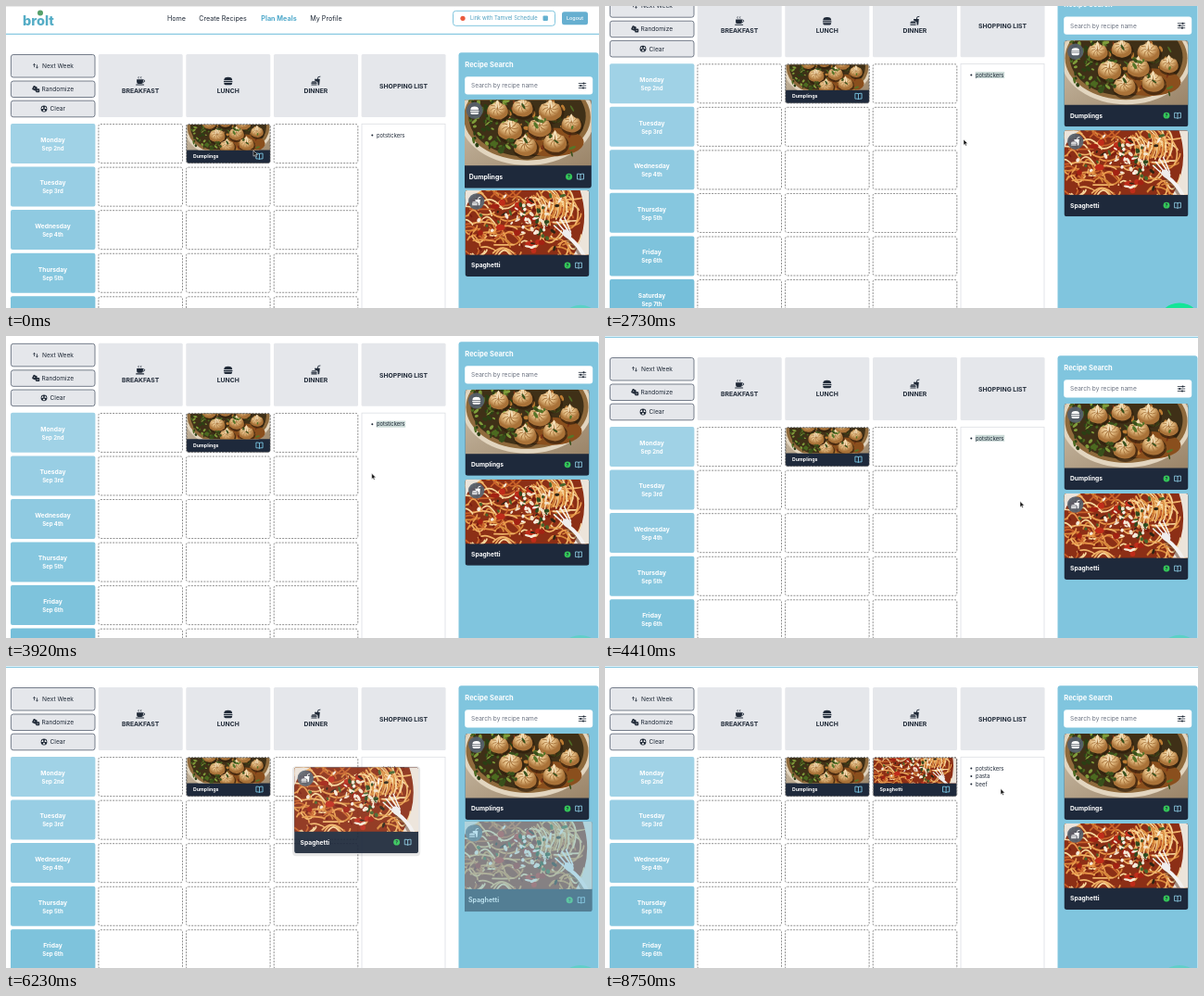
Write an HTML page that moves like this. It is 640 px wide and 326 px high and loops after 8.82 s.

```html
<!DOCTYPE html>
<html lang="en">
<head>
<meta charset="utf-8">
<title>Meal planner</title>
<style>
  html, body { margin: 0; width: 100%; height: 100%; overflow: hidden; background: #fff; }
  svg#stage { display: block; width: 100vw; height: 100vh; }
  text { font-family: Inter, "Open Sans", sans-serif; }
</style>
</head>
<body>
<svg id="stage" viewBox="0 0 640 326"></svg>
<script>
const LOOP = 8820, STEP = 70;
const INK = '#1f2937', BLUE = '#80c5de', NAVY = '#1e293b', GREY = '#e5e7eb';

let seed = 11;
const rnd = (a = 0, b = 1) => {
  seed = (seed * 16807) % 2147483647;
  return a + (b - a) * seed / 2147483647;
};
const pick = list => list[Math.floor(rnd(0, list.length))];
const many = (n, fn) => Array.from({ length: n }, (_, i) => fn(i)).join('');

// y is the vertical middle of the letters
const txt = (x, y, s, size, o = {}) =>
  `<text x="${x}" y="${y + size * .36}" font-size="${size}" font-weight="${o.w || 400}"
    fill="${o.fill || INK}" text-anchor="${o.at || 'start'}">${s}</text>`;
const mid = (x, y, s, size, o = {}) => txt(x, y, s, size, { ...o, at: 'middle' });
const box = (x, y, w, h, fill, more = '') =>
  `<rect x="${x}" y="${y}" width="${w}" height="${h}" fill="${fill}" ${more}/>`;
const path = (d, stroke, w, more = '') =>
  `<path d="${d}" fill="none" stroke="${stroke}" stroke-width="${w}" stroke-linecap="round" ${more}/>`;
const put = (x, y, s, k = 1) => `<g transform="translate(${x} ${y}) scale(${k})">${s}</g>`;

// Icons, each about 10 units wide around 0,0
const burger = c => `<g fill="${c}"><path d="M-4.5-.8Q-4.5-4.2 0-4.2T4.5-.8Z"/>
  <rect x="-4.8" y="0" width="9.6" height="1.3" rx=".6"/><path d="M-4.5 2H4.5Q4.5 4.2 2.8 4.2H-2.8Q-4.5 4.2-4.5 2Z"/></g>`;
const meal = c => `<g fill="${c}"><path d="M-1.4-2.2H4.4L3.7 4.4H2.2V2.4Q2.2.2-.9 0Z"/>
  <path d="M-5 1.7Q-5 .3-2 .3T1.2 1.7Z"/><rect x="-5" y="2.2" width="6.2" height=".8"/>
  <rect x="-5" y="3.5" width="6.2" height="1.1" rx=".5"/></g>${path('M2-2.2L2.5-4.4 4.6-4.8', c, .9)}`;
const cup = c => `<g fill="${c}"><path d="M-4-1.8H2.8V1Q2.8 2.9 1 2.9H-2.2Q-4 2.9-4 1Z"/>
  <rect x="-5" y="3.5" width="9" height="1.1" rx=".5"/></g>
  ${path('M2.9-1.1H3.5Q4.7-1 4.6.1T3 1.3', c, .9)}${path('M-2-2.8Q-2.8-3.6-2-4.6M.6-2.8Q-.2-3.6.6-4.6', c, .7)}`;
const book = c => path('M0-2.5Q-1.5-3.1-3.4-2.9V2.6Q-1.4 2.4 0 3Q1.4 2.4 3.4 2.6V-2.9Q1.5-3.1 0-2.5V3', c, .85);
const help = `<circle r="3.4" fill="#34c759"/>${mid(0, 0, '?', 5, { w: 700, fill: NAVY })}`;
const sliders = path('M-4-2.6H4M-4 0H4M-4 2.6H4', INK, .8) +
  `<g fill="${INK}"><circle cx="1.6" cy="-2.6" r="1.1"/><circle cx="-1.8" r="1.1"/><circle cx="1" cy="2.6" r="1.1"/></g>`;
const swap = path('M-1.5 1V-2.2M-2.5-1.2L-1.5-2.3-.5-1.2M1.5-1V2.2M.5 1.2L1.5 2.3 2.5 1.2', INK, .7);
const dice = `<g fill="${INK}"><rect x="-3.6" y="-2.7" width="4.6" height="4.6" rx=".8" transform="rotate(25)"/>
  <rect x=".2" y="-.5" width="4" height="4" rx=".7"/></g><g fill="#fff"><circle cx="-1.2" cy="-1" r=".55"/>
  <circle cx="2.2" cy="1.5" r=".55"/></g>`;
const hazard = `<circle r="3.4" fill="${INK}"/><g fill="#fff">` +
  many(3, i => `<path d="M0 0L-1.4-2.4H1.4Z" transform="rotate(${i * 120 + 180})"/>`) + `</g><circle r=".9" fill="${INK}"/>`;

// Food pictures, 134 x 69.5
const leaf = (x, y, c) =>
  `<ellipse cx="${x}" cy="${y}" rx="${rnd(1.5, 4)}" ry="${rnd(.8, 2)}" fill="${c}" transform="rotate(${rnd(0, 180)} ${x} ${y})"/>`;
const dumpling = ([x, y, r]) => put(x, y,
  `<ellipse cx="1" cy="3" rx="13.5" ry="11" fill="#2d1c0c" opacity=".65"/>
   <path d="M0-12Q4-7 9-6.5Q14 0 11 6Q6 11 0 10.5T-11 6Q-14 0-9-6.5Q-4-7 0-12Z" fill="url(#dough)"/>` +
  many(9, i => path('M0 0Q3.5-4 2-8.5', '#a8743c', .9, `transform="translate(0 -2.5) rotate(${i * 40}) scale(1 .9)"`)) +
  path('M-1.5-3Q-2-8 0-11Q2-8 1.5-3', '#f4dfb8', 1.6), r);
const dumplings = () => box(0, 0, 134, 70, 'url(#table)') +
  `<ellipse cx="67" cy="20" rx="70" ry="49" fill="#e2d5bf"/><ellipse cx="67" cy="19" rx="66" ry="45" fill="#8f6a3c"/>
   <ellipse cx="67" cy="18" rx="61" ry="42" fill="#3f3017"/><ellipse cx="92" cy="45" rx="34" ry="15" fill="#8a4f1d"/>` +
  many(75, () => leaf(rnd(8, 50), rnd(0, 50), pick(['#4c6a20', '#7f9c3a', '#2b3f14']))) +
  many(50, () => leaf(rnd(35, 122), rnd(0, 56), pick(['#4f6d24', '#bd7d33', '#7b3416']))) +
  [[36, 12, .9], [62, 9, .9], [91, 12, 1], [113, 26, .85], [49, 32, 1.05], [80, 29, 1], [65, 49, 1], [96, 45, 1]].map(dumpling).join('') +
  many(20, () => leaf(rnd(22, 118), rnd(2, 58), pick(['#567528', '#38501b'])));

const NOODLE = ['#f0b468', '#d98a3c', '#f8d79c', '#c9622a', '#e89a4c'];
const spaghetti = () => box(0, 0, 134, 70, '#8c2f16') +
  many(120, i => {
    const x = rnd(-14, 118), y = rnd(-6, 74), a = rnd(7, 18), b = rnd(-14, 14);
    return path(`M${x} ${y}q${a / 2} ${b} ${a} ${b / 3}t${a / 2} ${-b}`, NOODLE[i % 5], 1.7);
  }) +
  many(30, () => leaf(rnd(2, 105), rnd(5, 66), '#7a1d10')) +
  many(16, () => `<ellipse cx="${rnd(4, 100)}" cy="${rnd(5, 66)}" rx="${rnd(2.5, 5)}" ry="${rnd(2, 3.5)}" fill="${pick(['#c02c1a', '#a32213'])}"/>`) +
  many(22, i => path(`M${72 + i * 1.9} ${rnd(-4, 8)}q${rnd(8, 16)} ${rnd(6, 14)} ${rnd(2, 8)} ${rnd(22, 32)}`, NOODLE[i % 3], 1.6)) +
  `<path d="M0 0H18Q5 6 0 20Z" fill="#ece4da"/><path d="M124 0H134V70H117Q136 36 124 0Z" fill="#ece4da"/>` +
  many(40, () => leaf(rnd(55, 92), rnd(14, 46), pick(['#f8efe2', '#f3e3cb', '#2f4a1e']))) +
  many(28, () => leaf(rnd(12, 110), rnd(3, 64), pick(['#f6ead8', '#47642b', '#2f2414']))) +
  path('M111 52Q121 60 127 74', '#5a3a2a', 5.5, 'opacity=".5"') + path('M111 50Q122 58 129 72', '#f3f1f0', 4) +
  path('M96 38L107 48M99 34L109 46M103 31L112 45M107 29L114 45', '#f6f4f3', 1.5) +
  `<ellipse cx="110" cy="47" rx="5.5" ry="4" fill="#efedec" transform="rotate(40 110 47)"/>`;

const pic = (id, draw) =>
  `<symbol id="${id}" viewBox="0 0 134 69.5" preserveAspectRatio="xMidYMid slice">${draw()}</symbol>`;

const defs = `<defs>
  <radialGradient id="dough" cx=".45" cy=".35"><stop stop-color="#f8e3bb"/><stop offset=".55" stop-color="#e2ba80"/>
    <stop offset="1" stop-color="#a97238"/></radialGradient>
  <linearGradient id="table" x2="1" y2="1"><stop stop-color="#cdbfa9"/><stop offset="1" stop-color="#9a8468"/></linearGradient>
  <clipPath id="round"><rect width="134" height="93" rx="3"/></clipPath>
  <clipPath id="small"><rect width="90" height="41.5" rx="2"/></clipPath>
  <clipPath id="results"><rect x="495" y="101.5" width="145" height="400"/></clipPath>
  ${pic('dumplings', dumplings)}${pic('spaghetti', spaghetti)}</defs>`;

const card = (name, icon) => `<g clip-path="url(#round)">${box(0, 0, 134, 93, NAVY)}
  <use href="#${name.toLowerCase()}" width="134" height="69.5"/></g>
  <circle cx="12.2" cy="12" r="8.7" fill="#56606c" opacity=".92"/>${put(12.2, 12, icon('#fff'), .95)}
  ${txt(6.5, 81, name, 6.7, { w: 700, fill: '#fff' })}${put(110.5, 81, help)}${put(122.5, 81, book('#8fd0e8'))}`;
const cellCard = name => `<g clip-path="url(#small)">${box(0, 0, 90, 42, NAVY)}
  <use href="#${name.toLowerCase()}" width="90" height="27.5"/></g>
  ${box(0, 0, 90, 41.5, 'none', 'rx="2" stroke="#555" stroke-width=".7" stroke-dasharray="2 1.4"')}
  ${txt(7, 34.2, name, 5.25, { w: 700, fill: '#fff' })}${put(78.5, 34.2, book('#7cc8e6'), 1.05)}`;

const header = box(0, 0, 640, .6, '#dcdcdc') + `<circle cx="37" cy="7.5" r="3" fill="#56a06b"/>` +
  mid(35, 15.5, 'brolt', 14.5, { w: 800, fill: '#55adc6' }) +
  mid(184, 13.3, 'Home', 7.2) + mid(234, 13.3, 'Create Recipes', 7.2) +
  mid(294.5, 13.3, 'Plan Meals', 7.25, { w: 700, fill: '#4fa9cb' }) + mid(345.5, 13.3, 'My Profile', 7.2) +
  box(482.5, 5.3, 110, 16, '#fff', `rx="3" stroke="${BLUE}"`) + `<circle cx="493" cy="13.3" r="2.6" fill="#ea5a3c"/>` +
  txt(501, 13.3, 'Link with Tamvel Schedule', 5.8, { fill: '#4d9fc0' }) +
  box(579.5, 10.6, 5.4, 5.4, '#62b0d0', 'rx="1"') +
  box(600, 6.3, 28, 14, '#66afd0', 'rx="2.5"') + mid(614, 13.3, 'Logout', 5.4, { w: 500, fill: '#fff' }) +
  box(0, 29.7, 640, 1.3, '#8ccbe2');

const button = (y, h, label, x, icon, ix) =>
  box(5.4, y, 90.6, h, GREY, 'rx="2.5" stroke="#566070" stroke-width=".8"') +
  put(ix, y + h / 2, icon) + txt(x, y + h / 2, label, 6.6);
const buttons = button(52.5, 24.5, 'Next Week', 39, swap, 32) +
  button(81, 17.5, 'Randomize', 38.5, dice, 32) + button(102.2, 17.6, 'Clear', 47.5, hazard, 41);

const COLS = [99.7, 194.3, 289, 383.6];
const heads = [['BREAKFAST', cup], ['LUNCH', burger], ['DINNER', meal], ['SHOPPING LIST']].map(([s, icon], i) => {
  const x = COLS[i], c = x + 45.4;
  return box(x, 52, 91, 68, GREY, 'rx="1.5"') +
    (icon ? put(c, 81, icon(INK)) : '') + mid(c, icon ? 91.5 : 86.5, s, 6.8, { w: 700 });
}).join('');

const DAYS = [['Monday', '2nd', '#a0d2e6'], ['Tuesday', '3rd', '#98cee4'], ['Wednesday', '4th', '#8fcae1'],
  ['Thursday', '5th', '#86c7df'], ['Friday', '6th', '#7ec3dc'], ['Saturday', '7th', '#76bfda'], ['Sunday', '8th', '#6ebbd7']];
const rows = DAYS.map(([day, date, fill], i) => {
  const y = 127 + i * 46.55;
  return box(5, y, 91.4, 43, fill, 'rx="2"') +
    mid(50.5, y + 17.5, day, 6.7, { w: 700, fill: '#fff' }) + mid(50.5, y + 26.7, 'Sep ' + date, 6, { w: 700, fill: '#fff' }) +
    COLS.slice(0, 3).map(x => box(x + .2, y + .6, 90.6, 42, '#fff',
      'rx="2" stroke="#737373" stroke-width=".8" stroke-dasharray="2 1.3"')).join('');
}).join('');

const item = (y, s) => `<circle cx="395.3" cy="${y}" r="1" fill="${INK}"/>` + txt(400, y, s, 5.85);
const list = box(384, 127.3, 90, 322, '#fff', 'stroke="#dcdfe3" stroke-width=".8"') +
  box(399.7, 135.8, 0, 7, '#cbdad7', 'id="mark"') + item(139.4, 'potstickers') +
  `<g id="added">${item(148, 'pasta')}${item(156.6, 'beef')}</g>`;

const side = box(488.5, 50.3, 151, 500, BLUE, 'rx="3"') +
  txt(495.3, 63.5, 'Recipe Search', 7.5, { w: 700, fill: '#fff' }) +
  box(495.2, 76.3, 138, 19.3, '#fff', 'rx="3"') + txt(502, 86, 'Search by recipe name', 6.6, { fill: '#6b7280' }) +
  put(622, 86, sliders, .95) +
  `<g clip-path="url(#results)"><g id="cardA">${card('Dumplings', burger)}</g><g id="cardB">${card('Spaghetti', meal)}</g></g>`;

document.getElementById('stage').innerHTML = defs + box(0, 0, 640, 326, '#fff') +
  `<g id="page">${header}${buttons}${heads}${rows}${list}${side}${put(195, 128, cellCard('Dumplings'))}
   <g id="dinner">${put(289.6, 128, cellCard('Spaghetti'))}</g></g>
   <circle id="chat" cx="620" cy="345" r="24" fill="#14e598"/>
   <g id="drag">${box(-2, -1, 138, 97, '#000', 'rx="4" opacity=".1"')}${card('Spaghetti', meal)}</g>
   <path id="cursor" d="M0 0V6.2L1.4 4.9 2.3 7 3.4 6.5 2.5 4.5H4.5Z" fill="#111" stroke="#fff" stroke-width=".5"/>`;

const el = id => document.getElementById(id);
const show = (id, on) => el(id).setAttribute('visibility', on ? 'visible' : 'hidden');
const move = (id, x, y) => el(id).setAttribute('transform', `translate(${x} ${y})`);
const grow = (id, x, y, k) => el(id).setAttribute('transform',
  `translate(${x + 67} ${y + 46.5}) scale(${k}) translate(-67 -46.5)`);

// Rows of [time, ...values], eased from one to the next
function at(keys, t) {
  const i = keys.findIndex(k => k[0] > t);
  if (i < 0) return keys[keys.length - 1].slice(1);
  if (!i) return keys[0].slice(1);
  const a = keys[i - 1], b = keys[i], p = (t - a[0]) / (b[0] - a[0]), e = p * p * (3 - 2 * p);
  return a.slice(1).map((v, j) => v + (b[j + 1] - v) * e);
}

const GRAB = 5200, DROP = 7070;
const SCROLL = [[1890, 0], [2600, 64.8], [2870, 64.8], [3430, 54], [3710, 54], [4200, 29]];
const POINTER = [[280, 267, 156], [900, 399, 139], [1050, 399, 139], [1450, 431, 139], [1820, 387, 144],
  [3780, 387, 144], [4410, 448, 178.5], [4620, 448, 178.5], [GRAB, 541, 192], [DROP, 333, 116], [7350, 333, 116],
  [8120, 405, 150], [8400, 412, 144], [8750, 427, 132.5]];
const MARK = [[1050, 0], [1450, 31.5]];
const SIZE_A = [[0, 1.036], [280, 1]];
const SIZE_B = [[4970, 1], [GRAB, 1.05], [DROP, 1.05], [7140, 1.035], [7350, 1]];
const DRAG = [[GRAB, 495.5, 170], [5740, 351.5, 128], [6440, 300, 104], [DROP, 288, 96]];

function draw(t) {
  const dragging = t >= GRAB && t < DROP;
  move('page', 0, -at(SCROLL, t)[0]);
  el('mark').setAttribute('width', t < 4760 ? at(MARK, t)[0] : 0);
  grow('cardA', 495.5, 102, at(SIZE_A, t)[0]);
  grow('cardB', 495.5, 199, at(SIZE_B, t)[0]);
  el('cardB').setAttribute('opacity', dragging ? .45 : 1);
  show('added', t >= DROP);
  show('dinner', t >= DROP);
  show('drag', dragging);
  el('drag').setAttribute('opacity', .93);
  move('drag', ...at(DRAG, t));
  show('cursor', t < GRAB || t >= 7280);
  move('cursor', ...at(POINTER, t));

  const lift = Math.max(0, Math.cos((t - 2730) / 2205 * 2 * Math.PI));
  el('chat').setAttribute('cy', 347 - 2.5 * lift);
  el('chat').setAttribute('opacity', .3 + .7 * lift);
}

function tick(now) {
  draw(Math.floor((now % LOOP) / STEP) * STEP);
  requestAnimationFrame(tick);
}
draw(0);
requestAnimationFrame(tick);
</script>
</body>
</html>
```
